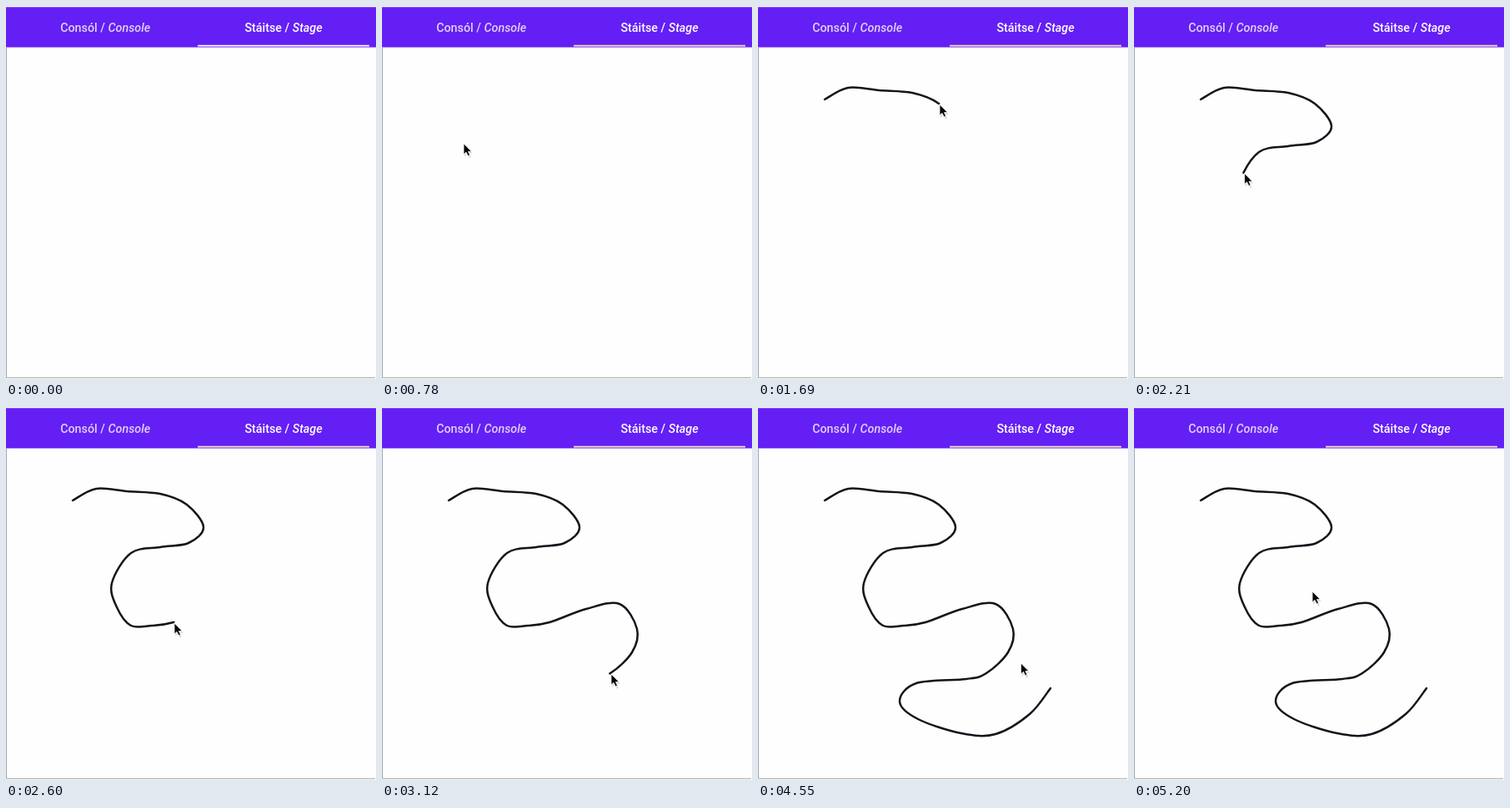
An HTML page that plays this animation: 444x447 px, repeating every 5330 ms.

```html
<!DOCTYPE html>
<html lang="ga">
<head>
<meta charset="utf-8">
<style>
  html, body { margin: 0; height: 100%; overflow: hidden; background: #fefefe; }
  svg { display: block; }
  text { font: 500 14.3px Roboto, sans-serif; fill: #fff; text-anchor: middle; }
  tspan { font-style: italic; }
</style>
</head>
<body>
<svg width="444" height="447" viewBox="0 0 444 447">
  <path d="M0 1.3H444V49.5H0z" fill="#641ff5"/>
  <text x="119.2" y="30.6" opacity=".8">Consól / <tspan>Console</tspan></text>
  <text x="333" y="30.6">Stáitse / <tspan>Stage</tspan></text>
  <path id="bar" d="M230 47.7H436" stroke-width="1.8"/>
  <path d="M.5 50V445.5H443" fill="none" stroke="#aaa"/>
  <path id="ink" fill="none" stroke="#15131c" stroke-width="2.5" stroke-linecap="round" stroke-linejoin="round"/>
  <g id="cursor">
    <path d="M1 2V16L4 13L7 18L9 16.5L7 12H11z" opacity=".12"/>
    <path d="M0 0V13L3 10.4L5.3 15L7.5 14L5.5 9.6H9.5z" fill="#07050c" stroke="#fff" stroke-width=".8"/>
  </g>
</svg>
<script>
const LOOP = 5330, STEP = 130;
const [bar, ink, cursor] = ['bar', 'ink', 'cursor'].map(id => document.getElementById(id));

// Key points of the drawn line, one row per stroke of the hand
const strokes = [
  [[80,112], [108,98], [145,101], [185,104], [217,117]],
  [[237,144], [219,163], [185,168], [150,175], [127,211], [133,240], [150,262], [175,262], [201,258]],
  [[245,242], [285,236], [306,266], [300,294], [274,319]],
  [[250,326], [190,331], [170,353], [192,374], [244,391], [285,392]],
  [[326,368], [351,337]]
];
const times = [1170, 1690, 2600, 3120, 3770, 4160];
const pts = strokes.flat();
const first = pts[0], last = pts[pts.length - 1];

// Smooth curve through the key points
const segs = pts.slice(1).map((c, i) => {
  const a = pts[i - 1] || first, b = pts[i], d = pts[i + 2] || c;
  const p = b.map((v, k) => v + (c[k] - a[k]) / 6);
  const q = c.map((v, k) => v - (d[k] - b[k]) / 6);
  return `C${p} ${q} ${c}`;
});

let count = -1;
const lengths = [0, ...strokes.map(s => {
  count += s.length;
  ink.setAttribute('d', `M${first}` + segs.slice(0, count).join(''));
  return ink.getTotalLength();
})];

const clamp = x => Math.min(1, Math.max(0, x));
const mix = (a, b, x) => a.map((v, k) => v + (b[k] - v) * x);

// Each stroke adds its share of the length at an even speed
const drawnAt = t => strokes.reduce((sum, _, i) =>
  sum + (lengths[i + 1] - lengths[i]) * clamp((t - times[i]) / (times[i + 1] - times[i])), 0);

function pointer(t, drawn) {
  if (t < times[0]) return mix([110, 200], first, (t - 520) / 650);
  if (t > 4160) {
    const x = clamp((t - 4290) / 780);
    return mix(last, [214, 221], x * x * (3 - 2 * x));
  }
  const p = ink.getPointAtLength(drawn);
  return [p.x + 1, p.y + 1];
}

function draw(now) {
  const t = Math.floor(now % LOOP / STEP) * STEP;
  const drawn = drawnAt(t);
  bar.setAttribute('stroke', t < STEP ? '#fff' : '#f9e9b4');
  ink.setAttribute('stroke-dasharray', `${drawn} 2000`);
  ink.style.display = drawn > 0 ? '' : 'none';
  cursor.style.display = t < 520 ? 'none' : '';
  cursor.setAttribute('transform', `translate(${pointer(t, drawn)})`);
}

const start = performance.now();
function tick() {
  draw(performance.now() - start);
  requestAnimationFrame(tick);
}
tick();
</script>
</body>
</html>
```
